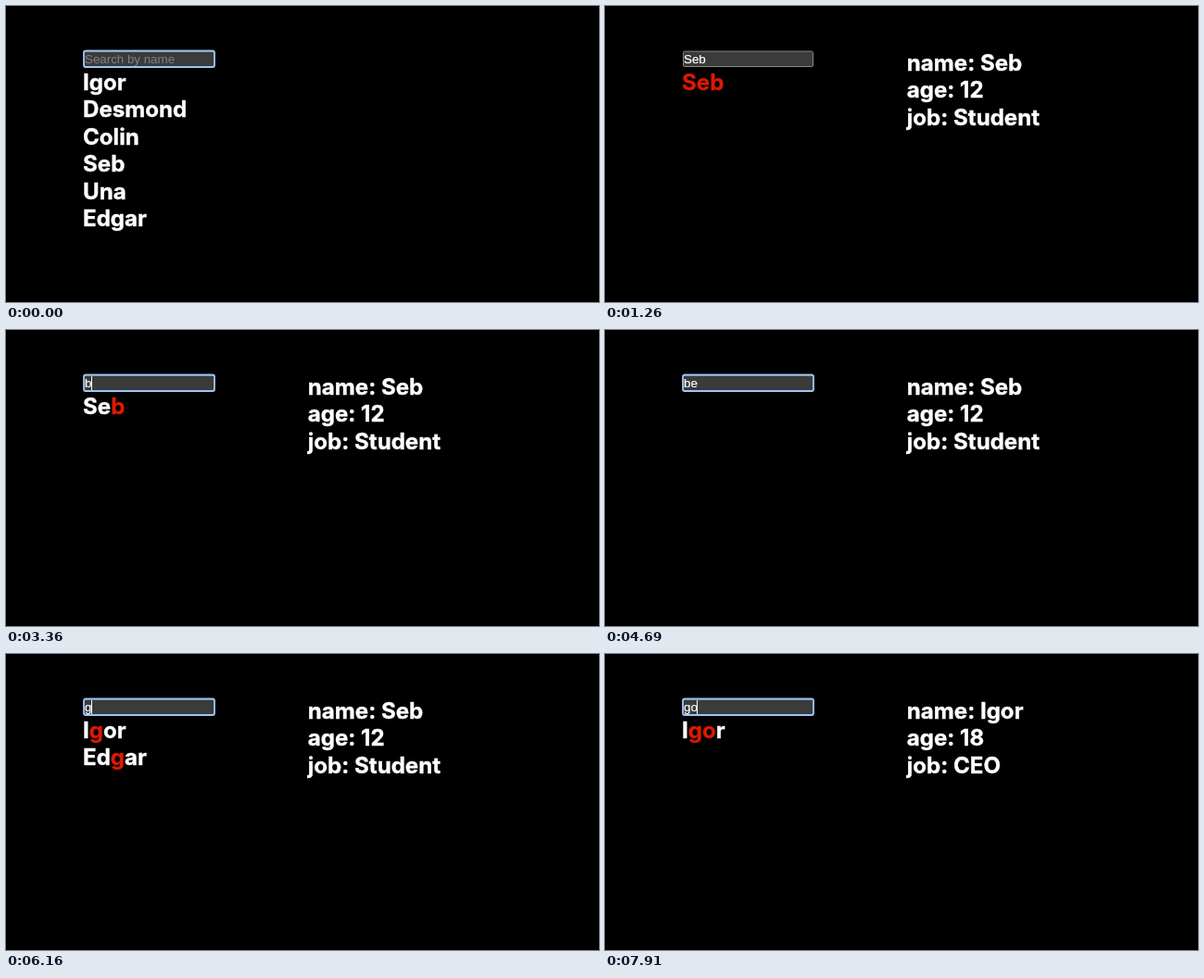
Recreate the animation shown at these times as an HTML page. Size 640 px wide and 320 px high, loop 8000 ms.

```html
<!DOCTYPE html>
<html lang="en">
<head>
<meta charset="utf-8">
<title>Name search</title>
<style>
  html, body { margin: 0; width: 100%; height: 100%; overflow: hidden; background: #000; }
  svg { display: block; width: 640px; height: 320px; }
  .big { font: 700 24.1px Inter, sans-serif; font-optical-sizing: none; fill: #fff; stroke: #fff; stroke-width: .4px; }
  .small { font: 13.333px "Liberation Sans", Arial, sans-serif; fill: #fff; stroke: #fff; stroke-width: .2px; }
  .hint { fill: #808080; stroke: none; }
  .hit { fill: #dc1a00; stroke: rgba(160, 12, 0, .5); stroke-width: 1px; paint-order: stroke; }
  #field { fill: #3b3b3b; stroke: #858585; stroke-width: 1px; }
  #ring { fill: none; stroke: #9cc6f6; stroke-width: 1.8px; }
  #caret { fill: #fff; }
</style>
</head>
<body>
<svg viewBox="0 0 640 320">
  <rect id="field" x="84.5" y="49" width="140" height="16.5" rx="1.5"/>
  <rect id="ring" x="84" y="48.5" width="141" height="17.5" rx="2"/>
  <text id="hint" class="small hint" x="85" y="61.5">Search by name</text>
  <text id="query" class="small" x="85" y="61.5"></text>
  <rect id="caret" y="50" width="1" height="15"/>
  <g id="list" class="big"></g>
  <g id="details" class="big"></g>
</svg>
<script>
const LOOP = 8000, LINE = 29.5;
const names = ["Igor", "Desmond", "Colin", "Seb", "Una", "Edgar"];
const people = {
  Seb: { age: 12, job: "Student" },
  Igor: { age: 18, job: "CEO" }
};

// Each track holds [start time, value] pairs.
const tracks = {
  query: [[0, ""], [70, "S"], [210, "Se"], [420, "Seb"], [2800, ""],
    [3290, "b"], [3500, "be"], [3640, "beb"], [4690, "be"], [4830, "b"],
    [4970, ""], [6160, "g"], [6230, "go"]],
  focus: [[0, true], [1190, false], [1890, true], [7210, false], [7630, true]],
  caret: [[0, false], [70, true], [980, false], [1890, true], [4200, false],
    [4760, true], [5250, false], [5810, true], [6790, false], [7630, true]],
  person: [[0, ""], [1260, "Seb"], [7280, "Igor"]]
};

const $ = id => document.getElementById(id);
const at = (track, time) => track.findLast(([start]) => start <= time)[1];
const show = (id, on) => $(id).setAttribute("visibility", on ? "visible" : "hidden");

function svg(tag, text, attrs = {}) {
  const node = document.createElementNS("http://www.w3.org/2000/svg", tag);
  node.textContent = text;
  for (const key in attrs) node.setAttribute(key, attrs[key]);
  return node;
}

function nameRow(name, query, row) {
  const text = svg("text", "", { x: 83, y: 90.7 + row * LINE });
  const start = name.indexOf(query), end = start + query.length;
  text.append(name.slice(0, start));
  if (query) text.append(svg("tspan", name.slice(start, end), { class: "hit" }));
  text.append(name.slice(end));
  return text;
}

function detailRows(name) {
  if (!name) return [];
  return Object.entries({ name, ...people[name] }).map(([key, value], row) =>
    svg("text", `${key}: ${value}`, { x: 325.8, y: 69.7 + row * LINE }));
}

let drawn = "";
function render(now) {
  const time = now % LOOP;
  const state = {};
  for (const key in tracks) state[key] = at(tracks[key], time);
  const signature = JSON.stringify(state);
  if (signature !== drawn) {
    drawn = signature;
    const { query, focus, caret, person } = state;
    $("query").textContent = query;
    const width = query ? $("query").getComputedTextLength() : 0;
    $("caret").setAttribute("x", Math.floor(85 + width));
    show("hint", !query);
    show("ring", focus);
    show("caret", focus && caret);
    $("list").replaceChildren(...names.filter(name => name.includes(query))
      .map((name, row) => nameRow(name, query, row)));
    $("details").replaceChildren(...detailRows(person));
  }
}

const began = performance.now();
function tick() {
  render(performance.now() - began);
  requestAnimationFrame(tick);
}
tick();
</script>
</body>
</html>
```
